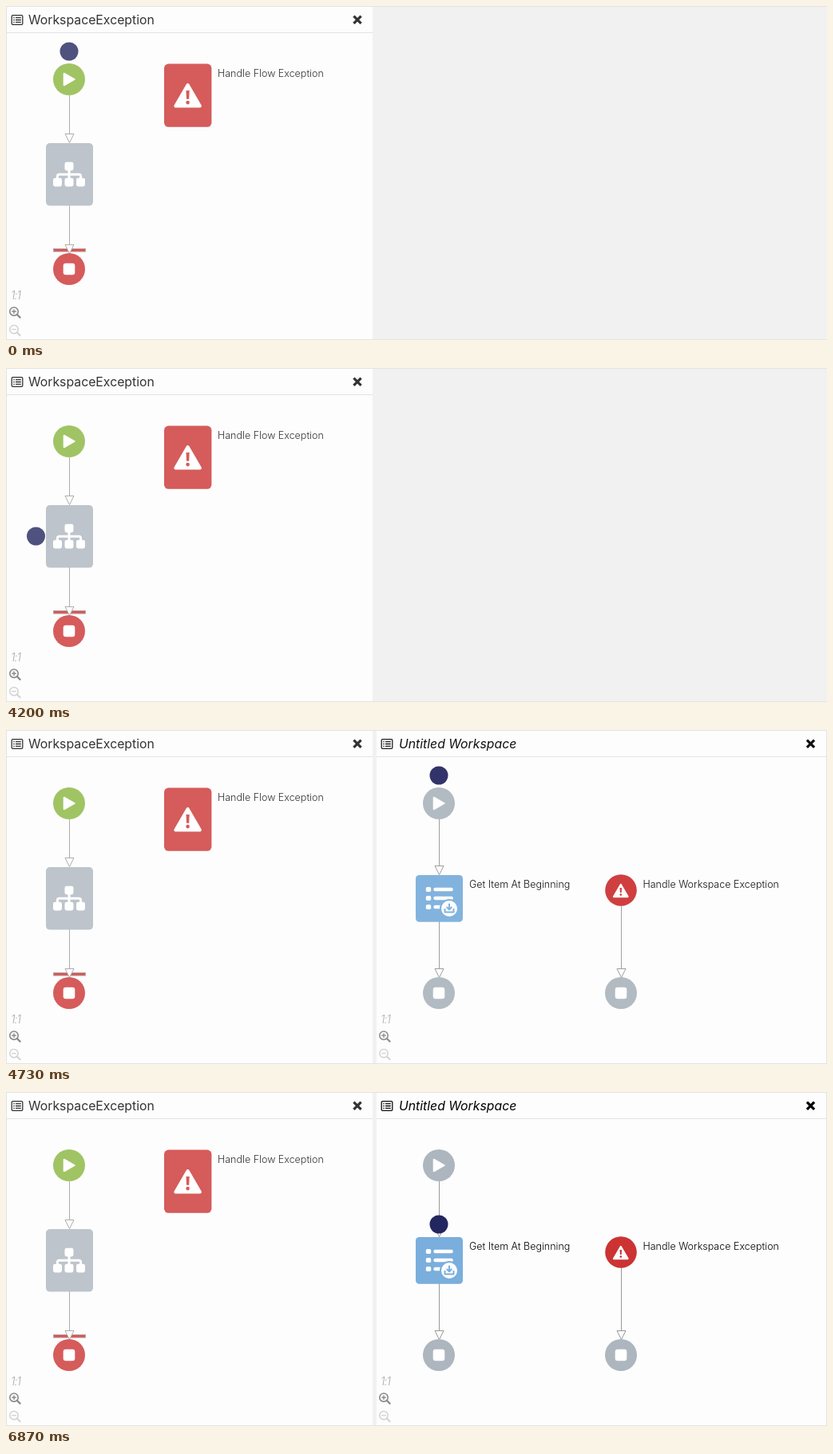
An HTML page that plays this animation: 1028 by 419 pixels, repeating every 8000 ms.

```html
<!DOCTYPE html>
<html lang="en">
<head>
<meta charset="utf-8">
<title>Workspace flow</title>
<style>
  html, body { margin: 0; width: 100%; height: 100%; overflow: hidden; background: #f1f1f1; }
  svg { display: block; width: 1028px; height: 419px; font-family: Inter, "Open Sans", sans-serif; }
  .title { font-size: 15.8px; }
  .label { font-size: 12.5px; font-weight: 300; }
  .ratio { font-size: 14px; font-weight: 300; font-style: italic; letter-spacing: -1px; fill: #aaa; }
  .stroke { fill: none; stroke: currentColor; }
  .white { fill: #fff; }
  .wire { fill: #fdfdfd; stroke: #999; }
</style>
</head>
<body>
<svg viewBox="0 0 1028 419">
  <defs>
    <g id="list" class="stroke" stroke-width="1.3">
      <rect x="7.2" y="11.7" width="13.6" height="11.6" rx="1.3"/>
      <path d="M9.3 14.7h1.4M9.3 17.5h1.4M9.3 20.3h1.4M12 14.7h6.8M12 17.5h6.8M12 20.3h6.8"/>
    </g>
    <path id="close" class="stroke" stroke-width="3.2" d="M-4.6-4.6L4.6 4.6M4.6-4.6L-4.6 4.6"/>
    <g id="play">
      <circle r="20"/>
      <path d="M-6.3-7.3V7.3L6.7 0Z" fill="#fff" stroke="#fff" stroke-width="2" stroke-linejoin="round"/>
    </g>
    <g id="stop">
      <circle r="20"/>
      <rect class="white" x="-7.3" y="-7.3" width="14.6" height="14.6" rx="3"/>
    </g>
    <g id="warn">
      <path d="M0-13.3L-15.3 13.2H15.3Z" fill="#fff" stroke="#fff" stroke-width="4" stroke-linejoin="round"/>
      <path d="M-2.1-6.2H2.1L1.6 4.4H-1.6Z"/>
      <circle cy="8.8" r="2.3"/>
    </g>
    <g id="tree">
      <path d="M0-5V5M-14.6 6V2.5Q-14.6 .2-12.3 .2H12.3Q14.6 .2 14.6 2.5V6" fill="none" stroke="#fff" stroke-width="3"/>
      <g class="white">
        <rect x="-5.5" y="-15.3" width="11" height="10.8" rx="2.4"/>
        <rect x="-20" y="4.7" width="11" height="10.8" rx="2.4"/>
        <rect x="-5.5" y="4.7" width="11" height="10.8" rx="2.4"/>
        <rect x="9" y="4.7" width="11" height="10.8" rx="2.4"/>
      </g>
    </g>
    <g id="items">
      <path d="M-13.2-11h0M-13.2 0h0M-13.2 11h0" stroke="#fff" stroke-width="6.4" stroke-linecap="square" transform="translate(0 .2)" style="display:none"/>
      <g class="white">
        <rect x="-16.5" y="-14" width="6.4" height="6" rx="1.8"/>
        <rect x="-16.5" y="-3" width="6.4" height="6" rx="1.8"/>
        <rect x="-16.5" y="8" width="6.4" height="6" rx="1.8"/>
        <rect x="-7" y="-13.2" width="24.5" height="4.4" rx="2.2"/>
        <rect x="-7" y="-2.2" width="24.5" height="4.4" rx="2.2"/>
        <rect x="-7" y="8.8" width="10" height="4.4" rx="2.2"/>
      </g>
      <circle class="white" cx="12.7" cy="13" r="11" stroke="#7aaedc" stroke-width="2"/>
      <path d="M12.7 6.7V13M9.4 11L12.7 14.3L16 11M7.2 13V17.6H18.2V13" fill="none" stroke="#7aaedc" stroke-width="2" stroke-linejoin="round"/>
    </g>
    <g id="zoom" class="stroke">
      <circle cx="10" cy="-.8" r="5.2" stroke-width="1.6"/>
      <path d="M14 3.2L17.6 6.8" stroke-width="2.3" stroke-linecap="round"/>
      <path d="M7.2-.8H12.8" stroke-width="1.4"/>
    </g>
    <g id="tools">
      <text class="ratio" x="6" y="368">1:1</text>
      <g color="#888">
        <use href="#zoom" y="384"/>
        <path class="stroke" stroke-width="1.4" d="M10 380.4V386"/>
      </g>
      <use href="#zoom" y="406.5" color="#d4d4d4"/>
    </g>
  </defs>

  <path d="M0 .5H1028M0 418.5H1028" stroke="#e3e3e3"/>

  <rect x="1" y="1" width="458" height="417" fill="#fdfdfd"/>
  <path d="M.5 0V419M1 33.5H459" stroke="#e3e3e3"/>
  <g opacity=".8">
    <use href="#list" color="#000"/>
    <text class="title" x="28" y="23">WorkspaceException</text>
    <use href="#close" x="440" y="17.3"/>
    <rect x="59.5" y="304.5" width="40" height="3.6" fill="#d22" stroke="#999"/>
    <g id="wiresA"></g>
    <use href="#play" x="79" y="92" fill="#89b63e"/>
    <rect x="50" y="172" width="59" height="78.6" rx="5" fill="#adb6be"/>
    <use href="#tree" x="79" y="211"/>
    <use href="#stop" x="79" y="330" fill="#c33"/>
    <g fill="#c33">
      <rect x="198" y="72.6" width="59.4" height="79.2" rx="5.5"/>
      <use href="#warn" x="227.6" y="112.3"/>
    </g>
    <text class="label" x="265" y="89">Handle Flow Exception</text>
    <circle id="tokenA" r="11.5" fill="#242660"/>
  </g>
  <use href="#tools"/>

  <g id="panel">
    <rect x="464" y="1" width="563" height="417" fill="#fdfdfd"/>
    <path d="M1027.5 0V419M464 33.5H1027" stroke="#e3e3e3"/>
    <g id="content">
      <use href="#list" x="463" color="#111"/>
      <text class="title" x="492" y="23" font-style="italic">Untitled Workspace</text>
      <use href="#close" x="1007.5" y="17.3"/>
      <g id="wiresB"></g>
      <g fill="#adb6be">
        <use href="#play" x="542" y="92"/>
        <use href="#stop" x="542" y="330"/>
        <use href="#stop" x="770" y="330"/>
      </g>
      <rect x="513" y="182" width="59" height="58.7" rx="4.5" fill="#7aaedc"/>
      <use href="#items" x="542.3" y="211"/>
      <g fill="#c33">
        <circle cx="770" cy="201" r="19.8"/>
        <use href="#warn" transform="translate(769.8 201.6) scale(.57)"/>
      </g>
      <text class="label" x="580" y="198">Get Item At Beginning</text>
      <text class="label" x="797.5" y="198">Handle Workspace Exception</text>
      <circle id="tokenB" r="11.5" fill="#242660"/>
      <use href="#tools" x="463"/>
    </g>
  </g>
</svg>
<script>
const LOOP = 8000;
const $ = id => document.getElementById(id);

// Arrow from y1 down to a hollow head whose tip is at y2.
const wire = (x, y1, y2) =>
  `<path class="wire" d="M${x} ${y1}V${y2 - 11}M${x - 5.5} ${y2 - 11}h11l-5.5 11z"/>`;
$('wiresA').innerHTML = wire(79.5, 112, 171.5) + wire(79.5, 250, 310.5);
$('wiresB').innerHTML = wire(542.5, 112, 181.5) + wire(542.5, 240, 310.5) + wire(770.5, 220, 310.5);

// [start time, value]; null hides the part.
const pathA = [[0, [79, 57]], [1270, [47.5, 92]], [1600, [79, 156]], [4200, [37.5, 211]], [4530, null]];
const pathB = [[0, null], [4670, [542, 57]], [6530, [510.3, 92]], [6870, [542, 166]]];
const fade = [[0, null], [4670, .88], [4730, .94], [4800, 1]];

const at = (steps, t) => steps.filter(s => s[0] <= t).pop()[1];
const show = (el, on) => el.style.display = on ? '' : 'none';

function place(el, pos) {
  show(el, pos);
  if (pos) el.setAttribute('transform', `translate(${pos})`);
}

function render(t) {
  const alpha = at(fade, t);
  place($('tokenA'), at(pathA, t));
  place($('tokenB'), at(pathB, t));
  show($('panel'), alpha);
  if (alpha) $('content').setAttribute('opacity', alpha);
}

const start = performance.now();
function tick() {
  render((performance.now() - start) % LOOP);
  requestAnimationFrame(tick);
}
tick();
</script>
</body>
</html>
```
